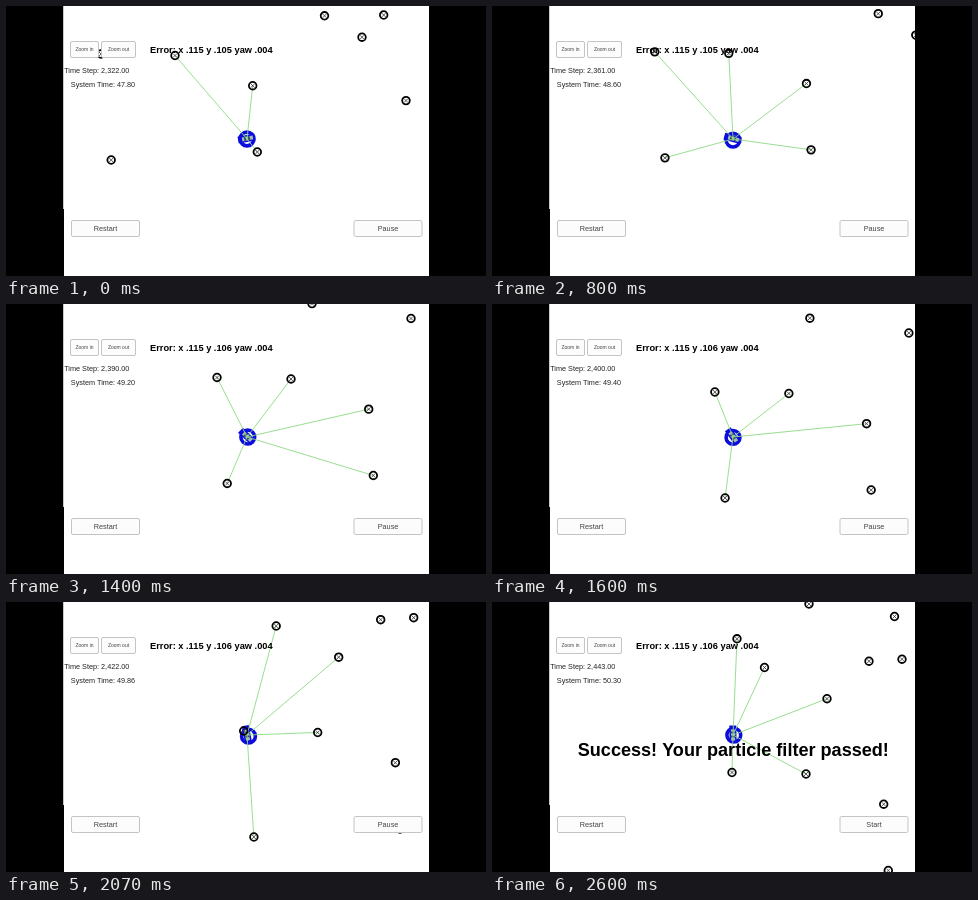
Recreate the animation shown at these times as an HTML page with a canvas. Size 480x270 px, loop 3.27 s.

```html
<!DOCTYPE html>
<html lang="en">
<head>
<meta charset="utf-8">
<title>Particle filter run</title>
<style>
html, body { margin: 0; width: 100%; height: 100%; overflow: hidden; background: #000; }
canvas { display: block; width: 480px; height: 270px; }
</style>
</head>
<body>
<canvas id="stage" width="480" height="270"></canvas>
<script>
const ctx = document.getElementById('stage').getContext('2d');
const LOOP = 3270, LAST = 39, STOP = 38;
const CAR = { x: 241, y: 133 }, RANGE = 136;
const FONT = '"Liberation Sans", Arial, sans-serif';
const BLUE = '#0c0cdc';

// Scroll of the scene at evenly spaced moments of the drive
const PATH_X = [0, 37.1, 71.4, 106.8, 132.1, 143.4, 145];
const PATH_Y = [0, -6.3, -1, 17.2, 47, 85, 122.5];

// Landmarks in scene coordinates, as "x,y"
const landmarks = `95,48 169,49.5 246.7,79.7 251.3,146 105.2,154 318.5,9.8
  377.7,9 356,31.2 400,94.6 289,-11 190,-25.8 127.5,-57 232,-63.3
  265,-65.3 100,-85.7 257.5,-108 172,-120.5`
  .split(/\s+/).map(pair => pair.split(',').map(Number));

// Catmull-Rom curve through evenly spaced values, u in 0..1
function spline(values, u) {
  const last = values.length - 1;
  const i = Math.min(last - 1, Math.floor(u * last)), f = u * last - i;
  const b = values[i], c = values[i + 1];
  const a = i > 0 ? values[i - 1] : 2 * b - c;
  const d = i + 2 <= last ? values[i + 2] : 2 * c - b;
  return b + f / 2 * (c - a + f * (2 * a - 5 * b + 4 * c - d + f * (3 * (b - c) + d - a)));
}

function scrollAt(tick) {
  const u = Math.min(1, tick / STOP);
  return [spline(PATH_X, u), spline(PATH_Y, u)];
}

function headingAt(tick) {
  const t = Math.min(STOP, Math.max(1, tick));
  const [x1, y1] = scrollAt(t - 1), [x2, y2] = scrollAt(t);
  return Math.atan2(y1 - y2, x1 - x2);
}

function circle(x, y, r) {
  ctx.beginPath();
  ctx.arc(x, y, r, 0, Math.PI * 2);
}

function line(x1, y1, x2, y2) {
  ctx.beginPath();
  ctx.moveTo(x1, y1);
  ctx.lineTo(x2, y2);
  ctx.stroke();
}

function box(color, x, y, w, h) {
  ctx.fillStyle = color;
  ctx.fillRect(x, y, w, h);
}

function text(label, x, y, size, align = 'left', weight = '') {
  ctx.font = `${weight} ${size}px ${FONT}`;
  ctx.textAlign = align;
  ctx.fillText(label, x, y);
}

function button(label, x, y, w, h, size) {
  ctx.fillStyle = '#fcfcfc';
  ctx.strokeStyle = '#c4c4c4';
  ctx.lineWidth = 1;
  ctx.beginPath();
  ctx.roundRect(x, y, w, h, 1.5);
  ctx.fill();
  ctx.stroke();
  ctx.fillStyle = '#444';
  text(label, x + w / 2, y + h / 2 + size * 0.36, size, 'center');
}

function landmark(x, y) {
  ctx.strokeStyle = '#000';
  ctx.lineWidth = 1.8;
  circle(x, y, 3.8);
  ctx.stroke();
  ctx.strokeStyle = '#333';
  ctx.lineWidth = 0.8;
  line(x - 2, y - 2, x + 2, y + 2);
  line(x - 2, y + 2, x + 2, y - 2);
}

function car(tick) {
  const x = CAR.x + 0.8 - 0.8 * Math.cos(tick * Math.PI / 6);
  const y = CAR.y + 0.6 - 0.6 * Math.cos(tick * Math.PI / 10);
  ctx.fillStyle = '#fff';
  ctx.strokeStyle = BLUE;
  ctx.lineWidth = 3.6;
  circle(x, y, 6.9);
  ctx.fill();
  ctx.stroke();

  ctx.save();
  ctx.translate(CAR.x, CAR.y - 0.5);
  ctx.rotate(headingAt(tick));
  box(BLUE, -8, -3.5, 17, 7);
  box('#a8bcb8', -6, -2, 11, 4);
  box('#34506c', -3, -2, 2, 4);
  box('#34506c', 1, -2, 2, 4);
  ctx.restore();
}

function draw(tick) {
  const [dx, dy] = scrollAt(tick), done = tick === LAST;
  const marks = landmarks.map(([x, y]) => [x + dx, y + dy]);
  box('#000', 0, 0, 480, 270);
  box('#c8c8c8', 57, 0, 1, 203);
  ctx.save();
  ctx.beginPath();
  ctx.rect(58, 0, 365, 270);
  ctx.clip();
  box('#fff', 58, 0, 365, 270);

  car(tick);
  ctx.strokeStyle = '#8edb84';
  ctx.lineWidth = 0.9;
  for (const [x, y] of marks) {
    if (Math.hypot(x - CAR.x, y - CAR.y) < RANGE) line(CAR.x, CAR.y, x, y);
  }
  marks.forEach(([x, y]) => landmark(x, y));

  button('Zoom in', 64.5, 35.5, 28, 16, 5);
  button('Zoom out', 95.5, 35.5, 34, 16, 5);
  button('Restart', 65.5, 214.5, 68, 16, 7.3);
  button(done ? 'Start' : 'Pause', 348, 214.5, 68, 16, 7.3);

  // The simulator runs in 20 ms steps and halts when the drive ends
  const clock = 47.8 + Math.min(125, Math.round(tick * 10 / 3)) * 0.02;
  const step = 2322 + Math.min(121, Math.floor(tick * 3.23 + 0.62));
  ctx.fillStyle = '#222';
  text(`Time Step: ${step.toLocaleString('en-US')}.00`, 58.2, 67, 7.27);
  text(`System Time: ${clock.toFixed(2)}`, 64.8, 80.5, 7.27);
  ctx.fillStyle = '#000';
  text(`Error: x .115 y .${tick < 21 ? 105 : 106} yaw .004`, 144, 47.3, 9.27, 'left', 'bold');
  if (done) text('Success! Your particle filter passed!', 241.3, 153.8, 18.08, 'center', 'bold');
  ctx.restore();
}

function frame() {
  const t = performance.now() % LOOP;
  let tick = 0;
  // Ticks run at 15 per second, rounded to 10 ms
  while (tick < LAST && Math.round((tick + 1) * 20 / 3) * 10 <= t) tick++;
  draw(tick);
  requestAnimationFrame(frame);
}
frame();
</script>
</body>
</html>
```
